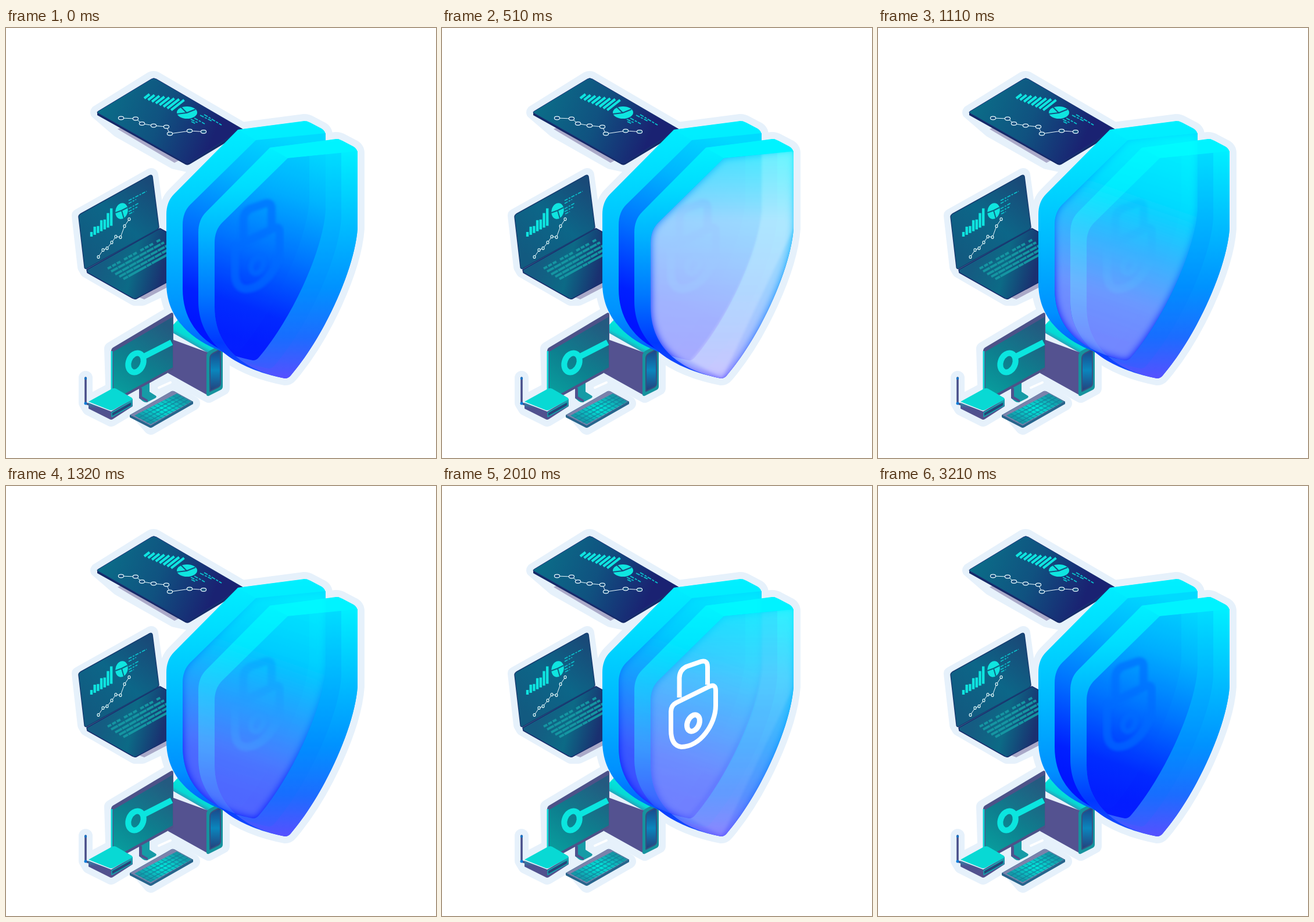
These frames come from a looping animation (740 px wide and 740 px high, 3440 ms). An HTML page:

```html
<!DOCTYPE html>
<html lang="en">
<head>
<meta charset="utf-8">
<title>Shielded devices</title>
<style>
html, body { margin: 0; width: 100%; height: 100%; overflow: hidden; background: #fff; }
svg { display: block; width: 100%; height: 100%; }
</style>
</head>
<body>
<svg viewBox="0 0 740 740" fill="none" stroke-linejoin="round">
<defs>
  <linearGradient id="tabletFill" gradientUnits="userSpaceOnUse" x1="170" y1="130" x2="350" y2="205">
    <stop stop-color="#0b6c88"/><stop offset=".5" stop-color="#105280"/><stop offset="1" stop-color="#1a2272"/>
  </linearGradient>
  <linearGradient id="laptopFill" gradientUnits="userSpaceOnUse" x1="140" y1="390" x2="245" y2="265">
    <stop stop-color="#125a80"/><stop offset=".5" stop-color="#0c6688"/><stop offset="1" stop-color="#194a78"/>
  </linearGradient>
  <linearGradient id="baseFill" gradientUnits="userSpaceOnUse" x1="165" y1="400" x2="270" y2="425">
    <stop stop-color="#155c82"/><stop offset=".5" stop-color="#0c6a86"/><stop offset="1" stop-color="#1a3070"/>
  </linearGradient>
  <linearGradient id="monitorFill" gradientUnits="userSpaceOnUse" x1="190" y1="635" x2="275" y2="510">
    <stop stop-color="#08a09f"/><stop offset=".45" stop-color="#0d808f"/><stop offset="1" stop-color="#245a80"/>
  </linearGradient>
  <linearGradient id="towerTop" gradientUnits="userSpaceOnUse" x1="334" y1="515" x2="314" y2="551">
    <stop stop-color="#00eee2"/><stop offset=".6" stop-color="#06d8d4"/><stop offset="1" stop-color="#545490"/>
  </linearGradient>
  <linearGradient id="slotFill" x2="0" y2="1">
    <stop stop-color="#1b4488"/><stop offset=".5" stop-color="#0a86bd"/><stop offset="1" stop-color="#24407c"/>
  </linearGradient>
  <linearGradient id="routerSide" x2="0" y2="1">
    <stop stop-color="#16b4bd"/><stop offset=".45" stop-color="#4d5290"/><stop offset="1" stop-color="#55508c"/>
  </linearGradient>
  <radialGradient id="keysFill">
    <stop stop-color="#00e9dc"/><stop offset="1" stop-color="#1595a5"/>
  </radialGradient>
  <linearGradient id="rimFill" gradientUnits="userSpaceOnUse" x1="0" y1="192" x2="0" y2="603">
    <stop stop-color="#00f4ff"/><stop offset=".2" stop-color="#00dcff"/><stop offset=".4" stop-color="#00b4ff"/>
    <stop offset=".65" stop-color="#0078ff"/><stop offset=".85" stop-color="#0038ff"/><stop offset="1" stop-color="#1c50ff"/>
  </linearGradient>
  <linearGradient id="backRim" gradientUnits="userSpaceOnUse" x1="0" y1="191" x2="0" y2="603">
    <stop stop-color="#00f0ff"/><stop offset=".2" stop-color="#00deff"/><stop offset=".5" stop-color="#00baff"/>
    <stop offset=".8" stop-color="#0090ff"/><stop offset="1" stop-color="#0050ff"/>
  </linearGradient>
  <linearGradient id="faceFill" gradientUnits="userSpaceOnUse" x1="0" y1="212" x2="0" y2="603">
    <stop stop-color="#00efff"/><stop offset=".3" stop-color="#00c0ff"/><stop offset=".6" stop-color="#0092ff"/>
    <stop offset=".82" stop-color="#1c6cff"/><stop offset="1" stop-color="#5650ff"/>
  </linearGradient>
  <linearGradient id="deepFill" gradientUnits="userSpaceOnUse" x1="545" y1="221" x2="430" y2="556">
    <stop stop-color="#00daff"/><stop offset=".25" stop-color="#00b4ff"/><stop offset=".55" stop-color="#0070ff"/>
    <stop offset=".85" stop-color="#0020ff"/><stop offset="1" stop-color="#0014ff"/>
  </linearGradient>
  <linearGradient id="backGlow" gradientUnits="userSpaceOnUse" x1="545" y1="221" x2="430" y2="556">
    <stop stop-color="#00ffff"/><stop offset=".3" stop-color="#04f4ff"/><stop offset=".55" stop-color="#50d8ff"/>
    <stop offset=".8" stop-color="#a4ccff"/><stop offset="1" stop-color="#acc0ff"/>
  </linearGradient>
  <linearGradient id="frontGlow" gradientUnits="userSpaceOnUse" x1="480" y1="212" x2="480" y2="603">
    <stop stop-color="#80f8ff" stop-opacity=".55"/><stop offset=".3" stop-color="#d8f2ff" stop-opacity=".72"/>
    <stop offset="1" stop-color="#e4deff" stop-opacity=".74"/>
  </linearGradient>
  <filter id="soft" x="-10%" y="-10%" width="120%" height="120%"><feGaussianBlur stdDeviation="7"/></filter>
  <filter id="haze"><feGaussianBlur stdDeviation="2"/></filter>
  <path id="body" d="M331 352Q331 330 344 317L454 206L568 191Q574 191 579 194L598 204Q605 208 605 216V345C600 416 547 531 490 598Q486 603 480 603C424 592 331 560 331 470Z"/>
  <path id="face" d="M359 370Q359 348 372 335L485 224L605 212V345C600 416 547 531 490 598Q486 603 480 603C424 592 359 560 359 480Z"/>
  <path id="topRim" d="M454 206L485 224L605 212L572 191Z"/>
  <clipPath id="inFace"><use href="#face"/></clipPath>
  <clipPath id="inBody"><use href="#body"/></clipPath>
  <g id="lock">
    <path d="M408.500 364V330Q409 317 420 311L446 302Q457 299 457 311V342M394 388Q394 378 403 373L460 345Q471 340 471 352V378C471 410 444 449 412 449Q394 447 394 420Z"/>
    <ellipse cx="432.500" cy="408" rx="10" ry="15" transform="rotate(24 432.500 408)" stroke-width="9"/>
  </g>
</defs>

<g fill="#e6f1fb" stroke="#e6f1fb" stroke-width="24" stroke-linecap="round">
  <path d="M157 145L250 87Q254 85 258 87L407 174L313 236L290 231L193 176Z"/>
  <path d="M125 323L250 253L263 345L290 360V440L235 466L222 466L139 418L135 411Z"/>
  <path d="M181 552L285 490L300 503L373 550V620L349 633L288 600L258 638L238 644L230 622L184 645Z"/>
  <path d="M137 602V645L143 655L181 674L218 652L249 688L322 646L288 625L218 640L186 620L143 643"/>
  <use href="#body"/><use href="#body" x="-55" y="-31"/>
</g>
<path d="M263 619L283 610" stroke="#fff" stroke-width="4" stroke-linecap="round"/>

<g id="tablet">
  <path d="M192 174L290 232L301 226L200 170Z" fill="#aaa9c8"/>
  <path d="M157 146V150L309 235Q313 237 317 234L407 180V174L258 90Z" fill="#152a68"/>
  <path d="M159 143L250 88Q254 85 259 88L407 174L316 231Q312 234 307 231L159 147Q155 145 159 143Z" fill="url(#tabletFill)" stroke="#1a3278"/>
  <ellipse cx="311.500" cy="145.500" rx="17.500" ry="10.500" fill="#0fe5e0"/>
  <path d="M294 148L311 146L301 136M311 146L326 140" stroke="#145080" stroke-width="2"/>
  <path d="M334 150L354 160M341 149L371 167M318 157L330 163M324 155L342 165M319 161L327 165" stroke="#0ac5ce" stroke-width="1.800" stroke-dasharray="7 2 4 2"/>
</g>

<g id="laptop">
  <path d="M230 464L278 436V446L238 467Z" fill="#aaa9c8"/>
  <path d="M139 416L265 345L300 364V425L224 466Q221 467 218 465L140 421Z" fill="url(#baseFill)" stroke="#182c6c" stroke-width="1.500"/>
  <path d="M125 325Q125 322 128 320L247 254Q251 252 252 256L263 342Q263 345 260 347L139 414Q135 415 135 411Z" fill="url(#laptopFill)" stroke="#163c70" stroke-width="1.500"/>
  <ellipse cx="199" cy="315" rx="10.500" ry="14" transform="rotate(14 199 315)" fill="#0fe5e0"/>
  <path d="M188 318L199 314L209 309M199 314L203 328" stroke="#0d6684" stroke-width="2"/>
  <path d="M211 297L242 281M211 302L224 295M211 311L229 301M211 316L226 308M212 320L220 316" stroke="#0ac5ce" stroke-width="1.600" stroke-dasharray="6 2 3 2"/>
  <g stroke="#1596a2" stroke-width="4">
    <path d="M175 414L266 364" stroke-dasharray="7 2 7 2 7 7"/>
    <path d="M181 419L272 369M188 424L280 373M195 428L280 381" stroke-dasharray="13 1"/>
    <path d="M202 432L280 389" stroke-dasharray="9 1 35 1"/>
  </g>
</g>

<g id="computer">
  <path d="M279 520L297 501L371 544L349 560Z" fill="url(#towerTop)"/>
  <path d="M279 532L289 537L349 559V633L279 594Z" fill="#545290"/>
  <path d="M345 565Q345 558 351 555L373 544V617Q373 621 369 623L349 633Q345 634 345 630Z" fill="#16939e"/>
  <path d="M351 568Q351 563 356 560L369 553V612Q369 616 365 618L351 625Z" fill="url(#slotFill)" stroke="#365082" stroke-width="2"/>
  <path d="M229 615L247 607V626L258 633Q260 635 257 637L243 644Q239 645 235 642L229 637Z" fill="#169ba6"/>
  <path d="M229 618L234 620V634L244 640V644L229 637Z" fill="#50528d"/>
  <path d="M181 555Q181 552 184 550L283 491Q288 488 288 494V585Q288 588 285 590L187 644Q181 646 181 641Z" fill="#4d5288"/>
  <path d="M182 556V641" stroke="#0bd5d4" stroke-width="3"/>
  <path d="M185 557L287 497V584L185 640Z" fill="url(#monitorFill)"/>
  <path d="M236 566L285 541" stroke="#0be5df" stroke-width="10"/>
  <ellipse cx="223.500" cy="576" rx="12.500" ry="17" transform="rotate(22 223.500 576)" stroke="#0be5df" stroke-width="10"/>
</g>

<g id="peripherals">
  <path d="M137 602V646L147 649" stroke="#474d89" stroke-width="3.500" stroke-linecap="round"/>
  <circle cx="137" cy="603" r="2.200" fill="#1474c4"/><circle cx="137" cy="646" r="2.500" fill="#087bd6"/>
  <path d="M142 645L181 660L218 638V651L184 673Q181 675 178 673L142 655Z" fill="url(#routerSide)"/>
  <path d="M142 643L182 621Q186 619 190 621L216 636Q219 638 216 640L185 657Q181 659 177 657Z" fill="#08d9d4"/>
  <path d="M182 662L216 643V650L182 669Z" fill="#244579" stroke="#12a6ad" stroke-width="1.500"/>
  <path d="M213 666L285 625Q288 624 291 626L322 643V647L252 687Q249 689 246 687L213 670Z" fill="#27648c"/>
  <path d="M214 666L285 625Q288 624 291 626L320 643L249 684Z" fill="#7a82ab"/>
  <path d="M221 667L294 629L319 643L249 682Z" fill="url(#keysFill)"/>
  <path d="M228 671L301 633M235 675L307 636M242 679L313 640" stroke="#147e99" stroke-width="1.200"/>
</g>

<g transform="translate(-55 -31)">
  <use href="#body" fill="url(#backRim)"/>
  <use href="#topRim" fill="#00f0ff" opacity=".6"/>
  <use href="#face" fill="url(#deepFill)"/>
  <g clip-path="url(#inFace)">
    <use href="#face" class="back" fill="url(#backGlow)" filter="url(#soft)"/>
  </g>
</g>

<use href="#body" fill="url(#rimFill)"/>
<use href="#topRim" fill="#00f3ff"/>
<use href="#face" fill="url(#faceFill)"/>
<g clip-path="url(#inFace)">
  <use href="#face" x="-28" y="-17" fill="#0070ff" opacity=".14"/>
  <use href="#body" x="-55" y="-31" fill="url(#deepFill)" opacity=".9"/>
  <use href="#face" x="-83" y="-48" fill="#0040ff" opacity=".06"/>
  <use href="#lock" id="lockShade" stroke="#006cff" stroke-width="14" filter="url(#haze)"/>
</g>
<g clip-path="url(#inBody)">
  <g transform="translate(-55 -31)" clip-path="url(#inFace)">
    <use href="#face" class="back" fill="url(#backGlow)" filter="url(#soft)"/>
  </g>
</g>
<g clip-path="url(#inFace)">
  <use href="#face" class="front" fill="url(#frontGlow)" filter="url(#soft)"/>
  <path class="front" d="M550 217V314C545 385 492 500 427 572L482 603L605 345V212Z" fill="#fff" fill-opacity=".2" filter="url(#haze)"/>
</g>
<use href="#lock" id="lockLight" stroke="#fff" stroke-width="8"/>
</svg>

<script>
const LOOP = 3440;
const svgNS = "http://www.w3.org/2000/svg";

function add(parent, tag, attrs) {
  const node = document.createElementNS(svgNS, tag);
  for (const name in attrs) node.setAttribute(name, attrs[name]);
  document.getElementById(parent).append(node);
}

function lineChart(parent, points, rx, ry, fill) {
  add(parent, "polyline", { points: points.join(" "), stroke: "#eafaff", "stroke-width": 1 });
  for (const [cx, cy] of points) add(parent, "ellipse", { cx, cy, rx, ry, fill, stroke: "#eafaff", "stroke-width": 1.2 });
}

function bar(parent, d, width, stroke = "#0fe5e0") {
  add(parent, "path", { d, stroke, "stroke-width": width });
}

lineChart("tablet", [[198, 155], [223, 156], [234, 164.5], [254, 168], [276, 170], [282, 182], [316, 177], [340, 178.5]], 4.6, 2.8, "#135080");
lineChart("laptop", [[159, 394], [167, 382], [174, 379], [182, 369], [189, 359], [197, 360], [204, 341], [212, 329]], 1.9, 2.5, "#0c6884");

for (let i = 0; i < 8; i++) {
  const reach = 9 + i * 1.9;
  bar("tablet", `M${238 + i * 6.6} ${121 + i * 2.9}l${reach} ${-reach * .78}`, 4.2);
}
[8, 14, 12, 19, 17, 25, 30].forEach((height, i) =>
  bar("laptop", `M${147 + i * 5.7} ${359 - i * 3.1}v${-height}`, 4.4));
for (let i = 1; i < 11; i++)
  bar("peripherals", `M${221 + i * 6.6} ${667 - i * 3.4}l28 15`, 1, "#147e99");

// Smoothly interpolates [time, value] keys.
function track(keys, t) {
  const i = keys.findIndex(key => key[0] > t);
  if (i < 0) return keys.at(-1)[1];
  const [t0, v0] = keys[i - 1], [t1, v1] = keys[i];
  const p = (t - t0) / (t1 - t0);
  return v0 + (v1 - v0) * p * p * (3 - 2 * p);
}

const front = [[0, 0], [540, 1], [940, 0], [1620, 0], [2010, .42], [2900, .42], [3210, 0]];
const back = [[0, 0], [540, 0], [1095, .66], [1640, .1], [2010, .35], [2900, .35], [3210, 0]];
const lock = [[0, 0], [1620, 0], [2010, 1], [2900, 1], [3210, 0]];

function setOpacity(selector, value) {
  document.querySelectorAll(selector).forEach(node => node.setAttribute("opacity", value));
}

function draw(now) {
  const t = now % LOOP;
  const lit = track(lock, t);
  setOpacity(".front", track(front, t));
  setOpacity(".back", track(back, t));
  setOpacity("#lockLight", lit);
  setOpacity("#lockShade", .65 * (1 - lit));
  requestAnimationFrame(draw);
}
draw(0);
</script>
</body>
</html>
```
